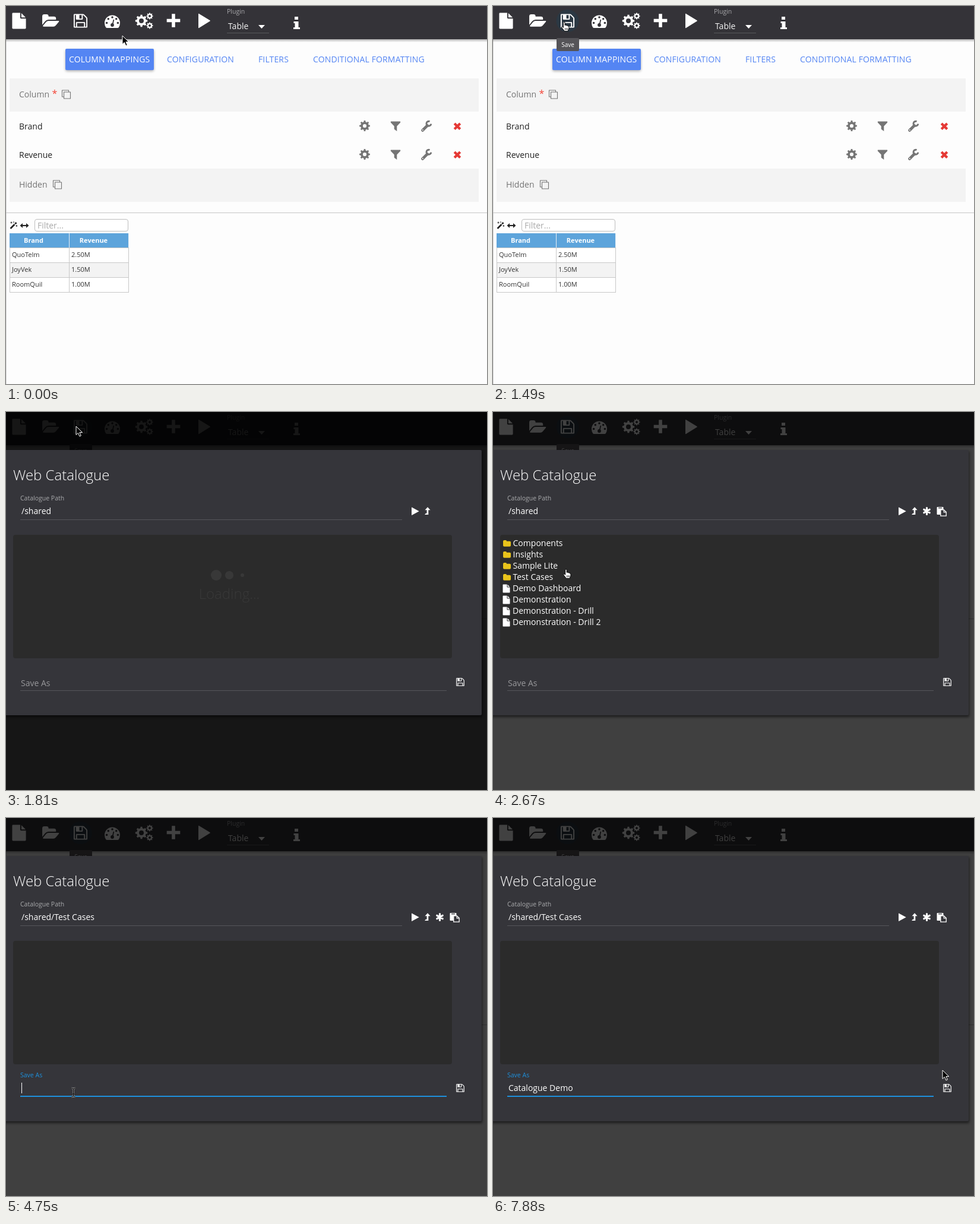
Recreate the animation shown at these times as an HTML page. Size 810x637 px, loop 8 s.

```html
<!DOCTYPE html>
<html lang="en">
<head>
<meta charset="utf-8">
<title>Saving to the catalogue</title>
<style>
html, body { margin: 0; width: 100%; height: 100%; overflow: hidden; background: #fdfdfd; }
svg { display: block; width: 100vw; height: 100vh; }
text { font-family: "Open Sans", "Noto Sans", sans-serif; white-space: pre; }
</style>
</head>
<body>
<svg id="stage" viewBox="0 0 810 637"></svg>
<script>
const LOOP = 8000;
const BAR = '#343338', SHEET = '#35353a', GREY = '#757575', BLUE = '#5485f3', FOCUS = '#1e90dc';

// ---- drawing helpers ----
const text = (x, y, size, fill, str, extra = '') =>
  `<text x="${x}" y="${y}" font-size="${size}" fill="${fill}" ${extra}>${str}</text>`;
const rect = (x, y, w, h, fill, extra = '') =>
  `<rect x="${x}" y="${y}" width="${w}" height="${h}" fill="${fill}" ${extra}/>`;
const path = (d, fill, extra = '') => `<path d="${d}" fill="${fill}" fill-rule="evenodd" ${extra}/>`;
const line = (d, stroke, width, extra = '') =>
  `<path d="${d}" fill="none" stroke="${stroke}" stroke-width="${width}" ${extra}/>`;
const dot = (x, y, r, fill, extra = '') => `<circle cx="${x}" cy="${y}" r="${r}" fill="${fill}" ${extra}/>`;
const group = (body, extra = '') => `<g ${extra}>${body}</g>`;
const icon = (d, cx, cy, size, fill) =>
  path(d, fill, `transform="translate(${cx} ${cy}) scale(${size / 1792}) translate(-896 -896)"`);

const FILE = 'M1152 512V40Q1174 54 1188 68L1596 476Q1610 490 1624 512ZM1024 544Q1024 640 1120 640H1664V1696Q1664 1792 1568 1792H224Q128 1792 128 1696V96Q128 0 224 0H1024Z';
const FOLDER_OPEN = 'M1815 952Q1815 983 1784 1018L1448 1414Q1340 1536 1184 1536H96Q9 1536 9 1480Q9 1449 40 1414L376 1018Q480 896 640 896H1728Q1815 896 1815 952ZM1472 608V768H640Q420 768 279 935L-63 1337V384Q-63 160 161 160H416Q640 160 640 384V416H1248Q1472 416 1472 608Z';
const FLOPPY = 'M224 128H1152Q1250 128 1316 196L1596 476Q1664 550 1664 640V1568Q1664 1664 1568 1664H224Q128 1664 128 1568V224Q128 128 224 128Z' +
  'M256 256H384V672Q384 768 480 768H1056Q1152 768 1152 672V256Q1205 260 1225 286L1506 567Q1536 600 1536 640V1536H1408V1120Q1408 1024 1312 1024H480Q384 1024 384 1120V1536H256Z' +
  'M512 1152H1280V1536H512ZM768 256H1024V640H768Z';
const FOLDER = 'M0 2Q0 0 2 0H4.500Q6 0 6 1.700H11Q13 1.700 13 3.500V9Q13 10.800 11 10.800H2Q0 10.800 0 9Z';

function gear(cx, cy, R, hole, n, fill) {
  const w = 2 * Math.PI / n, pts = [];
  for (let i = 0; i < n; i++)
    for (const [r, o] of [[.77, -.27], [1, -.19], [1, .19], [.77, .27]]) {
      const a = (i + o) * w - Math.PI / 2;
      pts.push((cx + R * r * Math.cos(a)).toFixed(2) + ' ' + (cy + R * r * Math.sin(a)).toFixed(2));
    }
  return path(`M${pts.join('L')}ZM${cx - hole} ${cy}a${hole} ${hole} 0 1 0 ${2 * hole} 0a${hole} ${hole} 0 1 0 ${-2 * hole} 0Z`, fill);
}

const copyIcon = (x, y) => line(
  `M${x + 3.5} ${y + 3.5}h11v11h-11zM${x + 3} ${y + 11.5}h-2.500v-11h11v2.500`, GREY, 1.1, 'stroke-linejoin="round"');

// ---- page ----
function toolbar() {
  const W = '#fff';
  const gauge = path('M166 28.500A13 13 0 0 1 192 28.500Q192 33 189.700 36.200Q189.200 37 188 37H170Q168.800 37 168.300 36.200Q166 33 166 28.500Z', W) +
    [[169.6, 28.5], [172.3, 21.8], [179, 19], [185.700, 21.8], [188.4, 28.5]].map(p => dot(p[0], p[1], 1.8, BAR)).join('') +
    dot(179, 32, 2.9, BAR) + line('M179.500 31L181.300 23.500', BAR, 1.7, 'stroke-linecap="round"');
  return rect(0, 56, 810, 5, 'url(#drop)') + rect(0, 0, 810, 56, BAR) +
    dot(125.5, 25, 19, '#2b3843', 'id="halo"') +
    icon(FILE, 22, 25, 27, W) + icon(FOLDER_OPEN, 75.5, 25, 27, W) + icon(FLOPPY, 125.5, 25, 27, W) + gauge +
    gear(228, 25, 10.3, 4, 8, W) + gear(242, 17, 5.6, 2, 8, W) + gear(242, 33, 5.6, 2, 8, W) +
    line('M273.500 24.500H290.500M282 16V33', W, 5.6, 'stroke-linecap="square" stroke-linejoin="round"') +
    path('M324 13.500Q324 12.500 325 13L343.500 24.300Q344.300 25 343.500 25.600L325 37Q324 37.500 324 36.500Z', W) +
    text(372, 12.5, 10.5, '#a9a9ac', 'Plugin') + text(374, 39, 14, '#f4f4f4', 'Table') +
    path('M425 32H436L430.500 38Z', W) + rect(372, 45, 71, 1, '#59595d') +
    path('M486 18H492V23H486ZM484.500 26H492.500V36H495V39H484V36H486.500V29H484.500Z', W);
}

function rowTools(y) {
  return gear(604, y, 9, 3.1, 8, GREY) +
    path(`M648 ${y - 7.5}H664Q664.500 ${y - 6} 664 ${y - 5.500}L658.300 ${y + .5}V${y + 9}L653.700 ${y + 5.500}V${y + .5}L648 ${y - 5.500}Q647.500 ${y - 6} 648 ${y - 7.5}Z`, GREY) +
    line(`M701.500 ${y + 7.500}L709.500 ${y - .5}`, GREY, 4.6, 'stroke-linecap="round"') +
    line(`M713.500 ${y - 7.300}A3.900 3.900 0 1 0 715.800 ${y - 3.400}`, GREY, 3) +
    dot(701.8, y + 7, .9, '#fdfdfd') +
    line(`M755.200 ${y - 4}L764.800 ${y + 5.600}M764.800 ${y - 4}L755.200 ${y + 5.600}`, '#e53935', 4.2);
}

function mappings() {
  const tabs = [[271, 'CONFIGURATION'], [425, 'FILTERS'], [517, 'CONDITIONAL FORMATTING']];
  const sp = 'letter-spacing=".14"';
  return rect(100, 74, 149, 36, '#000', 'rx="3" opacity=".3" filter="url(#soft)"') +
    rect(100, 72, 149, 36, BLUE, 'rx="2"') + text(106, 95, 14, '#fff', 'COLUMN MAPPINGS', sp) +
    tabs.map(([x, s]) => text(x, 95, 14, BLUE, s, sp)).join('') +
    rect(6, 122, 790, 56, '#f3f3f3') + text(22, 154, 14, GREY, 'Column') +
    text(77.5, 153, 16, '#f44336', '*') + copyIcon(94, 141.5) +
    text(22, 208, 14, '#222', 'Brand') + rowTools(202) +
    text(22, 256, 14, '#222', 'Revenue') + rowTools(250) +
    rect(6, 274, 790, 56, '#f3f3f3') + text(22, 306, 14, GREY, 'Hidden') + copyIcon(79, 293.5);
}

function table() {
  const rows = [['QuoTelm', '2.50M'], ['JoyVek', '1.50M'], ['RoomQuil', '1.00M']];
  const bold = 'font-weight="700" text-anchor="middle"';
  return rect(0, 348, 810, 1, '#c6c6c6') +
    line('M7.500 375L14.500 368M15.300 367.200L17.500 365', '#222', 2.7) +
    line('M9 363.500V366.500M7.500 365H10.500M13 363V365.500M18 369V372M16.500 370.500H19', '#222', 1) +
    line('M26 370H36', '#222', 2) + path('M23.500 370L28 366V374ZM38.500 370L34 366V374Z', '#222') +
    rect(48.5, 359.5, 157, 20, '#fff', 'rx="3.500" stroke="#bdbdbd"') + text(53, 375, 14, '#a9a9a9', 'Filter...') +
    rect(6, 383, 201, 25, '#5da4db') + rect(106, 383, 1, 25, '#e6eef5') + rect(206, 383, 1, 25, '#e6eef5') +
    text(46.5, 399, 11, '#fff', 'Brand', bold) + text(147.5, 399, 11, '#fff', 'Revenue', bold) +
    rows.map(([a, b], i) => {
      const y = 408 + 25 * i;
      return rect(6.5, y - .5, 200, 25, i % 2 ? '#f3f3f3' : '#fff', 'stroke="#c8c8c8"') +
        rect(106, y, 1, 24, '#c8c8c8') + text(10, y + 15, 11, '#333', a) + text(110, y + 15, 11, '#333', b);
    }).join('');
}

const tooltip = () => group(rect(107, 54, 38, 22, '#555458', 'rx="2"') +
  text(126, 69, 10, '#fff', 'Save', 'text-anchor="middle"'), 'id="tip"');

// ---- dialog ----
function shell() {
  return group(rect(-20, 66, 822, 448, '#000', 'opacity=".55" filter="url(#soft)"') +
    rect(-10, 64, 811, 447, SHEET, 'rx="2"') + rect(12, 207, 739, 208, '#2b2b2b', 'rx="4"') +
    rect(24, 181, 643, 1, '#55565a') + rect(24, 469, 718, 1, '#55565a'), 'id="shell"');
}

function form() {
  const folders = ['Components', 'Insights', 'Sample Lite', 'Test Cases'];
  const files = ['Demo Dashboard', 'Demonstration', 'Demonstration - Drill', 'Demonstration - Drill 2'];
  const item = (s, i) => (i < 4
    ? path(FOLDER, '#e8c31b', `transform="translate(17 ${216 + 19 * i})"`)
    : icon(FILE, 22.5, 221.5 + 19 * i, 14, '#fff')) +
    text(i < 4 ? 33.5 : 33, 226 + 19 * i, 14, '#fff', s);
  const extras = line('M730.500 161.500V172.500M725.800 164.300L735.200 169.700M735.200 164.300L725.800 169.700', '#fff', 3.2, 'stroke-linecap="round"') +
    rect(747.5, 160, 11, 13, '#fff', 'rx="1"') + rect(750, 161, 6, 1.3, SHEET) +
    path('M753.800 164.800H759.300L763.200 168.600V175.200H753.800Z', SHEET, 'stroke="#fff" stroke-width="1.300"') +
    line('M759.200 165V168.800H763', '#fff', 1.2);
  return group(
    text(12, 115, 24, '#fff', 'Web Catalogue', 'font-weight="300"') +
    text(24, 149, 10.5, '#aaabad', 'Catalogue Path') + text(26, 172, 14, '#fff', '', 'id="dir"') +
    path('M683 161Q683 160.300 683.700 160.700L695.700 167.200L683.700 173.800Q683 174.200 683 173.500Z', '#fff') +
    path('M705 173H711.300V165.200H714.600L710 160.300L705.500 165.200H708.600V170.800H707Z', '#fff') +
    icon(FLOPPY, 765, 455, 16, '#fff') +
    group(extras, 'id="extras"') +
    group(rect(17, 268.500, 730, 19, '#fff', 'id="hover" opacity=".04"') + [...folders, ...files].map(item).join(''), 'id="list"') +
    group([354, 376, 398].map(x => dot(x, 275, 0, '#fff', 'class="pulse"')).join('') +
      text(376, 315, 24, '#fff', 'Loading...', 'font-weight="300" text-anchor="middle"'), 'id="loading"') +
    rect(24, 468, 718, 2, FOCUS, 'id="rule"') + text(25, 462, 14, '#98989b', 'Save As', 'id="label"') +
    text(26, 460, 14, '#fff', '', 'id="name"') + rect(26, 446, 1, 18, '#fff', 'id="caret"'), 'id="form"');
}

function pointers() {
  const beam = 'M-3.500 -7.500Q0 -7.500 0 -5.500Q0 -7.500 3.500 -7.500M0 -5.500V5.500M-3.500 7.500Q0 7.500 0 5.500Q0 7.500 3.500 7.500M-1.500 2.500H1.500';
  return group(
    path('M0 0V14.500L3.400 11.300L5.900 17L8.300 16L5.900 10.500H10.600Z', '#000', 'id="arrow" stroke="#fff" stroke-width="1"') +
    group(path('M4 10V2Q4 .7 5.300 .7Q6.500 .7 6.500 2V6Q8.900 5 9 6.600Q11 6 11.200 7.400Q13.200 7 13.200 9V11Q13 13 12 14V16H5.500Q4 13.500 2 11.500Q.2 9.300 1.200 8.600Q2.400 8 4 10Z', '#fff', 'stroke="#000" stroke-width="1"') +
      line('M6.800 11V14M8.800 11V14M10.700 11V14', '#000', .8), 'id="hand" transform="translate(-5.300 -.7)"') +
    group(line(beam, '#ccc', 2.6, 'opacity=".6"') + line(beam, '#000', 1), 'id="beam"'), 'id="pointer"');
}

const stage = document.getElementById('stage');
stage.innerHTML = `<defs>
  <linearGradient id="drop" x2="0" y2="1"><stop stop-color="#000" stop-opacity=".3"/><stop offset="1" stop-color="#000" stop-opacity="0"/></linearGradient>
  <filter id="soft" x="-10%" y="-20%" width="120%" height="140%"><feGaussianBlur stdDeviation="2"/></filter></defs>` +
  rect(0, 0, 810, 637, '#fdfdfd') + rect(0, 56, 1, 581, '#d9d9d9') +
  mappings() + table() + toolbar() + tooltip() +
  rect(0, 0, 810, 637, '#000', 'id="shade"') + shell() + form() + pointers();

const el = {};
stage.querySelectorAll('[id]').forEach(n => el[n.id] = n);
const pulses = stage.querySelectorAll('.pulse');

// ---- timing ----
const clamp = v => Math.max(0, Math.min(1, v));
const set = (n, attrs) => { for (const k in attrs) n.setAttribute(k, attrs[k]); };
const show = (n, on) => set(n, { visibility: on ? 'visible' : 'hidden' });

// Piecewise linear track of [time, ...values].
function track(keys, t) {
  const i = keys.findIndex(k => k[0] > t);
  if (i < 0) return keys[keys.length - 1].slice(1);
  if (i === 0) return keys[0].slice(1);
  const a = keys[i - 1], b = keys[i], p = (t - a[0]) / (b[0] - a[0]);
  return a.slice(1).map((v, j) => v + (b[j + 1] - v) * p);
}

const MARKS = [0, 1490, 1640, 1810, 2020, 2230, 2370, 3410, 3560, 4600, 4750, 4890, 7880];
function capture(t) {
  const mark = MARKS.filter(m => m <= t).pop();
  return mark + Math.floor((t - mark) / 150) * 150;
}

const MOVES = [[0, 196, 50], [300, 214, 56], [450, 213, 55], [900, 124, 29], [1050, 120, 27], [1490, 120, 27],
  [1640, 118, 24], [1810, 118, 24], [2020, 118, 70], [2230, 119, 144], [2670, 123, 265], [2970, 121, 277],
  [3560, 121, 277], [3860, 122, 300], [4300, 114, 455], [4450, 113.500, 462.500], [7290, 113.500, 462.500],
  [7440, 260, 405], [7590, 530, 361], [7740, 715, 385], [7880, 757, 425]];
const SHADE = [[1500, 0], [1640, .14], [1810, .915], [2020, .8], [2230, .745]];
const KEYS = [[4890, 1], [5040, 2], [5190, 3], [5340, 4], [5490, 5], [5790, 6], [5940, 7],
  [6390, 8], [6540, 10], [6840, 12], [6990, 13], [7140, 14]];

function draw(time) {
  const t = capture(time);
  const [x, y] = track(MOVES, t);
  const beam = t >= 4300 && t < 7440;
  const hand = (t >= 1050 && t < 1640) || (t >= 2500 && t < 3560);
  set(el.pointer, { transform: `translate(${x.toFixed(1)} ${y.toFixed(1)})` });
  show(el.beam, beam);
  show(el.hand, hand);
  show(el.arrow, !beam && !hand);

  set(el.halo, { opacity: clamp((t - 1050) / 150) });
  set(el.tip, { opacity: clamp((t - 950) / 200) });

  set(el.shade, { opacity: track(SHADE, t)[0] });
  set(el.shell, { opacity: clamp((t - 1640) / 170) });
  set(el.form, { opacity: track([[1500, 0], [1640, .35], [1810, 1]], t)[0] });
  set(el.loading, { opacity: track([[1640, 1], [1810, .06], [2020, 0]], t)[0] });
  pulses.forEach((p, i) => set(p, { r: Math.max(0, Math.min(9, 7 + (t - 1640) / 42 - 4 * i)) }));

  const opened = t >= 3560, focused = t >= 4500;
  show(el.extras, t >= 2020);
  show(el.list, t >= 2020 && !opened);
  show(el.hover, t >= 2820 && !opened);
  el.dir.textContent = opened ? '/shared/Test Cases' : '/shared';

  const p = clamp((t - 4500) / 200);
  show(el.rule, focused);
  set(el.label, { x: 25 - p, y: 462 - 25 * p, 'font-size': 14 - 3.5 * p, fill: focused ? FOCUS : '#98989b' });

  const key = KEYS.filter(k => k[0] <= t).pop();
  el.name.textContent = 'Catalogue Demo'.slice(0, key ? key[1] : 0);
  show(el.caret, t >= 4750 && t < 7640);
  set(el.caret, { x: 26 + Math.round(key ? el.name.getComputedTextLength() : 0) });
}

const start = performance.now();
function tick() {
  draw((performance.now() - start) % LOOP);
  requestAnimationFrame(tick);
}
tick();
</script>
</body>
</html>
```
